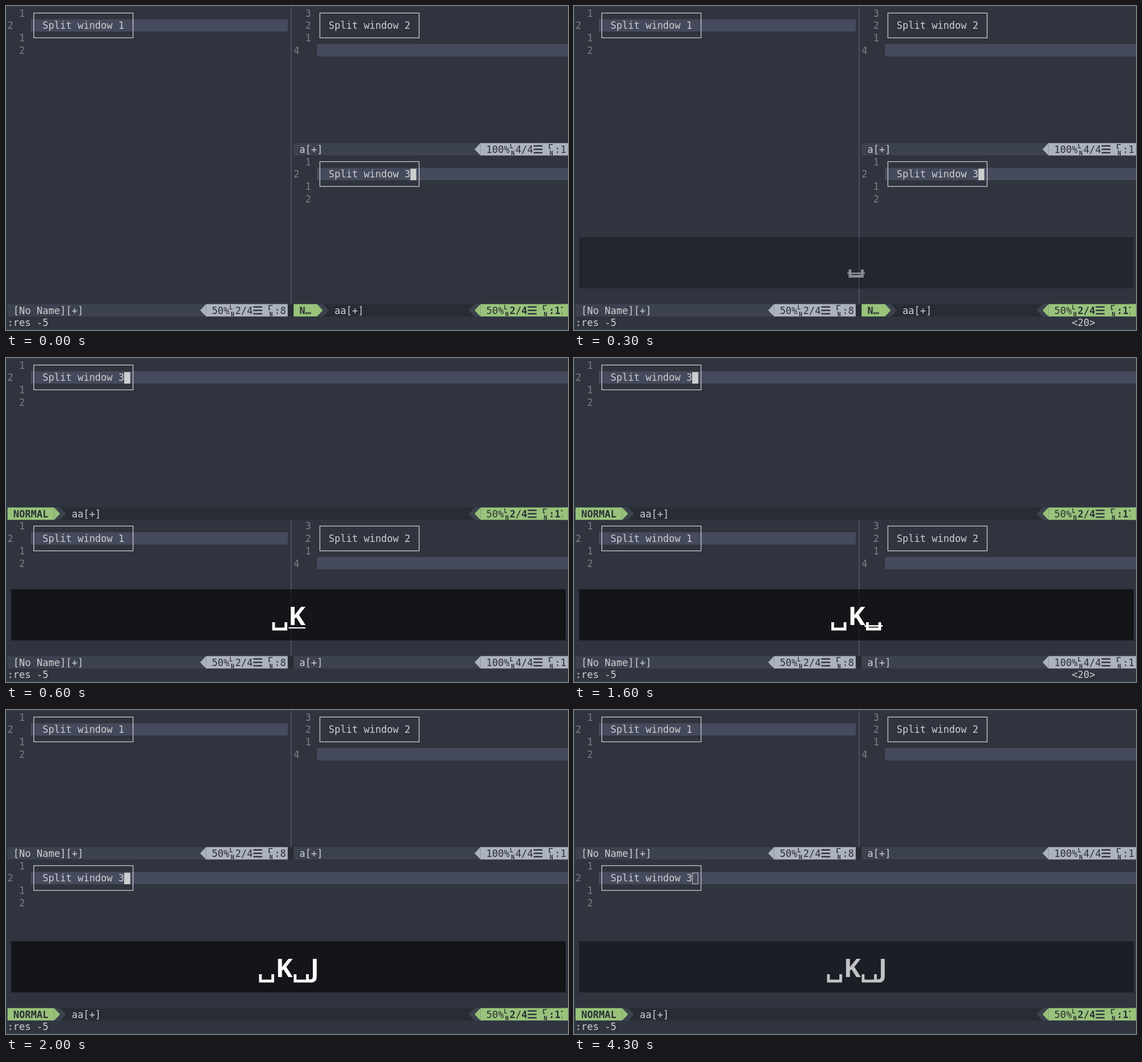
An HTML page for the animation above (4.4 s loop, 985 by 569 pixels).

```html
<!DOCTYPE html>
<html lang="en">
<head>
<meta charset="utf-8">
<title>Moving split windows</title>
<style>
html, body { margin: 0; width: 100%; height: 100%; overflow: hidden; background: #2f343f; }
svg { display: block; width: 985px; height: 569px; }
text { font: 17px "DejaVu Sans Mono", "Liberation Mono", monospace; white-space: pre; }
text.bold { font-weight: 700; }
text.tiny { font-size: 10px; font-weight: 700; }
text.key { font: 700 45px "Open Sans", "Noto Sans", sans-serif; }
</style>
</head>
<body>
<svg id="stage" viewBox="0 0 985 569"></svg>
<script>
const LOOP = 4400, CELL = 10.234, LINE = 21.75, RIGHT = 985;
const FG = '#cdcfcf', DIM = '#7a7e85', HILITE = '#454a5c', INK = '#2b303a';
const BAR = '#3d424f', DARK = '#282c34', GREY = '#adb2bf', GREEN = '#98c379';

const X = col => 2.6 + col * CELL;
const Y = row => 1.5 + row * LINE;

const rect = (x, y, w, h, fill) =>
  `<rect x="${x}" y="${y}" width="${w}" height="${h}" fill="${fill}"/>`;
const path = (d, stroke, width) =>
  `<path d="${d}" fill="none" stroke="${stroke}" stroke-width="${width}"/>`;
const poly = (points, fill) => `<polygon points="${points}" fill="${fill}"/>`;
const label = (x, y, s, fill, cls = '') =>
  `<text x="${x}" y="${y}" fill="${fill}" class="${cls}">${s}</text>`;
const type = (col, row, s, fill = FG, cls) => label(X(col), Y(row) + 17, s, fill, cls);
const cells = (from, to, row, fill) =>
  rect(X(from), Y(row), (to ? X(to) : RIGHT) - X(from), LINE, fill);

// Powerline triangles, one cell wide
const arrowRight = (col, row, fill) =>
  poly(`${X(col)},${Y(row)} ${X(col + 1)},${Y(row) + LINE / 2} ${X(col)},${Y(row + 1)}`, fill);
const arrowLeft = (col, row, fill) =>
  poly(`${X(col + 1)},${Y(row)} ${X(col)},${Y(row) + LINE / 2} ${X(col + 1)},${Y(row + 1)}`, fill);

function pane(col, row, end, numbers, current, name) {
  let out = cells(col + 4, end, row + current, HILITE);
  numbers.forEach((n, i) => {
    out += type(col + (i === current ? 0 : 2), row + i, n, DIM);
  });
  const left = X(col + 4.5), top = Y(row + .5);
  out += path(`M${left} ${top}h${17 * CELL}v${2 * LINE}h${-17 * CELL}z`, FG, 1.3);
  return out + type(col + 6, row + 1, 'Split window ' + name);
}

function position(col, row, percent, line, column, cls) {
  const at = col + percent.length, x = X(at), y = Y(row);
  const menu = X(at + 4), mark = menu + 27.6;
  let out = type(col, row, percent, INK);
  out += label(x, y + 9, 'L', INK, 'tiny') + label(x + 2.5, y + 21.5, 'N', INK, 'tiny');
  out += type(at + 1, row, line, INK, cls);
  for (const dy of [5, 11, 17]) out += rect(menu + 1, y + dy - 1.2, 15.5, 2.4, INK);
  out += path(`M${mark + 7} ${y + 2.5}h-6v7h2.5`, INK, 1.6);
  out += label(mark + 1.5, y + 21.5, 'N', INK, 'tiny');
  return out + label(mark + CELL, y + 17, ':' + column, INK, cls);
}

function idleBar(col, end, row, name, percent, line, column) {
  const tip = end ? 33 : 80;
  return cells(col, end, row, BAR) + type(col + 1, row, name) +
    arrowLeft(tip, row, GREY) + cells(tip + 1, end, row, GREY) +
    position(tip + 2, row, percent, line, column);
}

function activeBar(col, row, mode) {
  const edge = col + mode.length + (mode.length > 2 ? 2 : 2);
  return cells(col, 0, row, DARK) +
    cells(edge, edge + 1, row, BAR) + arrowRight(edge + 1, row, BAR) +
    cells(col, edge, row, GREEN) + arrowRight(edge, row, GREEN) +
    type(col + 1, row, mode, INK, 'bold') + type(edge + 3, row, 'aa[+]') +
    arrowLeft(79, row, BAR) + cells(80, 81, row, BAR) +
    arrowLeft(80, row, GREEN) + cells(81, 0, row, GREEN) +
    position(82, row, '50%', '2/4', '17', 'bold') +
    rect(975.3, Y(row), RIGHT - 975.3, LINE, GREEN);
}

const paneOne = row => pane(0, row, 48, [1, 2, 1, 2], 1, 1);
const paneTwo = row => pane(49, row, 0, [3, 2, 1, 4], 3, 2);
const paneThree = (col, row) => pane(col, row, 0, [1, 2, 1, 2], 1, 3) +
  `<rect class="cursor" x="${X(col + 20) + .4}" y="${Y(row + 1) + 2}" width="9.6" height="19.2" fill="${FG}" stroke="${FG}" stroke-width="1"/>`;
const barOne = row => idleBar(0, 48, row, '[No Name][+]', '50%', '2/4', '8');
const barTwo = row => idleBar(49, 0, row, 'a[+]', '100%', '4/4', '1');
const divider = (from, to) => rect(499.1, Y(from), 1.3, Y(to) - Y(from), '#596274');
const joint = row => cells(48, 49, row, DARK);

const layouts = [
  paneOne(0) + paneTwo(0) + paneThree(49, 12) + divider(0, 24) +
    barTwo(11) + barOne(24) + joint(24) + activeBar(49, 24, 'N…'),
  paneThree(0, 0) + activeBar(0, 12, 'NORMAL') + paneOne(13) + paneTwo(13) +
    divider(13, 24) + barOne(24) + joint(24) + barTwo(24),
  paneOne(0) + paneTwo(0) + divider(0, 11) + barOne(11) + joint(11) + barTwo(11) +
    paneThree(0, 12) + activeBar(0, 24, 'NORMAL')
];

const space = (x, y = 464) => path(`M${x + 2.4} ${y}v12h21.6v-12`, '#fff', 4.8);
const letter = (x, s) => label(x, 469, s, '#fff', 'key');
const line = (x, y, w, h) => `<g class="under">${rect(x, y, w, h, '#fff')}</g>`;

const keys = [
  '',
  space(481.3, 462.7) + line(479, 468, 31, 2.6),
  space(466.6) + letter(495, 'K') + line(495, 473, 30, 2),
  space(451) + letter(480.5, 'K') + space(511.8) + line(509, 469.2, 32, 2.6),
  space(443.5) + letter(472.7, 'K') + space(504.3) + letter(533.8, 'J') + line(541, 473, 3, 2)
];

// start, layout, keys shown, overlay opacity, underline, pending key, hollow cursor
const steps = [
  [0, 0, 0, 0, 0, 0, 0],
  [200, 0, 1, .12, 1, 1, 0],
  [300, 0, 1, .43, 1, 1, 0],
  [400, 0, 1, 1, 0, 1, 0],
  [600, 1, 2, 1, 1, 0, 0],
  [800, 1, 2, 1, 0, 0, 0],
  [1600, 1, 3, 1, 1, 1, 0],
  [1800, 1, 3, 1, 0, 1, 0],
  [2000, 2, 4, 1, 1, 0, 0],
  [2200, 2, 4, 1, 0, 0, 0],
  [4300, 2, 4, .7, 0, 0, 1]
];

const stage = document.getElementById('stage');
const group = (cls, body) => `<g class="${cls}">${body}</g>`;
stage.innerHTML =
  rect(0, 0, 985, 569, '#2c3a47') + rect(2.4, 1.2, 983, 566, '#2f343f') +
  layouts.map(s => group('layout', s)).join('') +
  type(0, 25, ':res -5') + group('pending', type(85, 25, '&lt;20&gt;')) +
  group('overlay', '<rect x="9" y="406" width="972" height="90" opacity=".6"/>' +
    keys.map(s => group('keys', s)).join(''));

const all = cls => [...stage.querySelectorAll('.' + cls)];
const show = (el, on) => { el.style.display = on ? '' : 'none'; };
const layoutEls = all('layout'), keyEls = all('keys'), underEls = all('under');
const cursorEls = all('cursor'), [pendingEl] = all('pending'), [overlayEl] = all('overlay');
let shown;

function render(time) {
  const step = steps.findLast(s => s[0] <= time);
  if (step === shown) return;
  shown = step;
  const [, layout, count, opacity, under, pending, hollow] = step;
  layoutEls.forEach((el, i) => show(el, i === layout));
  keyEls.forEach((el, i) => show(el, i === count));
  underEls.forEach(el => show(el, under));
  cursorEls.forEach(el => el.setAttribute('fill', hollow ? 'none' : FG));
  show(pendingEl, pending);
  overlayEl.style.opacity = opacity;
}

const start = performance.now();
function tick() {
  render((performance.now() - start) % LOOP);
  requestAnimationFrame(tick);
}
tick();
</script>
</body>
</html>
```
